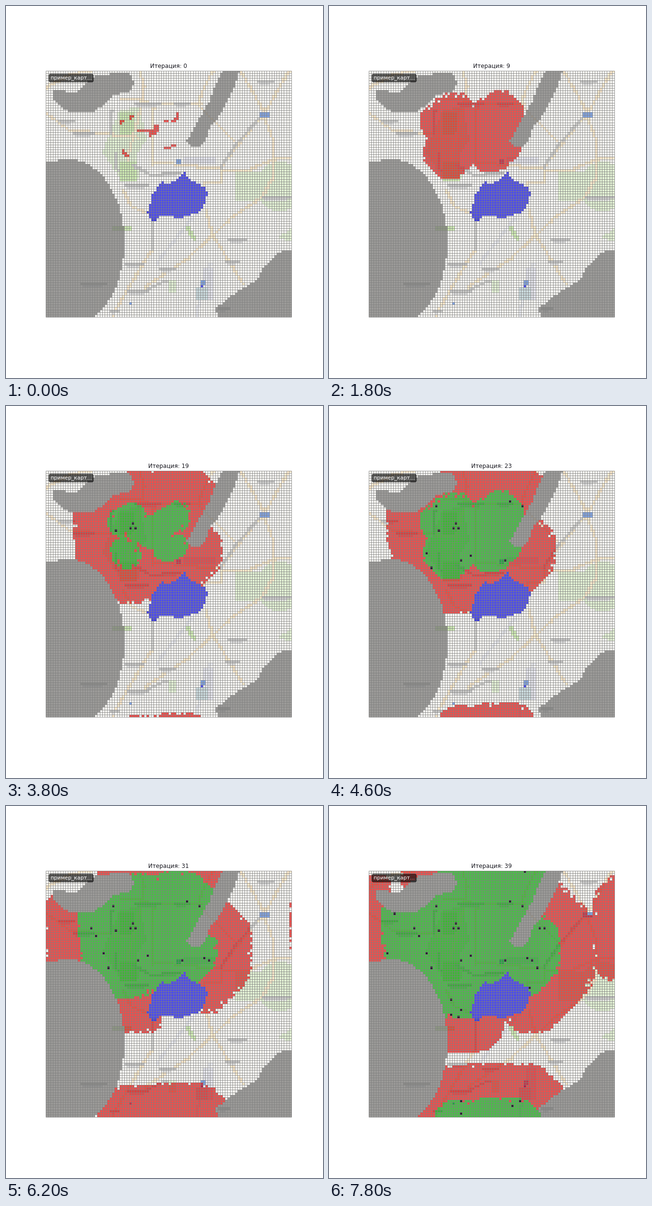
Recreate the animation shown at these times as a matplotlib script. Size 662 px wide and 775 px high, loop 8000 ms.

```python
import numpy as np
import matplotlib.pyplot as plt
from matplotlib.animation import FuncAnimation
from matplotlib.colors import to_rgb
from matplotlib.path import Path

N, STEPS, BURN_TIME = 100, 40, 14
rng = np.random.default_rng(7)
yy, xx = np.mgrid[0:N, 0:N]
centres = np.column_stack([xx.ravel() + 0.5, yy.ravel() + 0.5])


def area(*points):
    return Path(points).contains_points(centres).reshape(N, N)


def box(x, y, w, h=1):
    return (xx >= x) & (xx < x + w) & (yy >= y) & (yy < y + h)


def oval(cx, cy, rx, ry):
    return ((xx + 0.5 - cx) / rx) ** 2 + ((yy + 0.5 - cy) / ry) ** 2 < 1


def line(*points):
    """Cells crossed by a polyline."""
    mask = np.zeros((N, N), bool)
    for (xa, ya), (xb, yb) in zip(points, points[1:]):
        k = int(2 * max(abs(xb - xa), abs(yb - ya))) + 2
        x = np.linspace(xa, xb, k).astype(int).clip(0, N - 1)
        y = np.linspace(ya, yb, k).astype(int).clip(0, N - 1)
        mask[y, x] = True
    return mask


# ---- city map under the cells ----
city = np.empty((N, N, 3))
city[:] = to_rgb("#fbfaf6")


def paint(colour, *masks):
    for m in masks:
        city[m] = to_rgb(colour)


paint("#e3f2d5",
      area((30, 16), (38, 15), (41, 28), (37, 34), (38, 44), (31, 45), (23, 33)),
      box(77, 41, 11, 12), oval(95, 47, 9, 10),
      area((94, 68), (100, 64), (100, 69)), box(50, 85, 3, 5))
paint("#cde9b2", box(30, 37, 7, 8), box(30, 17, 6, 9), box(27, 63, 8, 2),
      line((57, 63), (60, 68)), line((58, 63), (60, 67)))
paint("#e4e4ec", box(64, 80, 4, 13), box(56, 35, 13, 3))
paint("#eaebf0", line((61, 58), (45, 78)), line((67, 78), (61, 99)))
paint("#fdeacc",
      line((100, 35), (93, 36), (83, 40), (71, 40), (43, 37)),
      line((88, 17), (92, 27), (92, 44), (88, 51), (74, 61), (58, 76), (40, 88)),
      line((99, 0), (89, 17), (72, 38), (71, 45), (64, 46)),
      line((79, 0), (89, 17)),
      line((68, 0), (63, 10), (62, 14), (77, 29)),
      line((0, 7), (9, 2), (18, 0)),
      line((38, 0), (40, 6), (39, 14), (33, 36)),
      line((30, 11), (36, 11), (44, 14), (63, 13)),
      line((0, 17), (9, 24), (37, 27)),
      line((31, 48), (35, 55), (42, 58)),
      line((65, 56), (68, 67), (80, 86)),
      line((43, 73), (27, 99)), line((44, 15), (43, 38)))
paint("#cececc",
      line((88, 18), (79, 28), (71, 39)), line((27, 16), (26, 25)),
      line((28, 33), (29, 40)), line((35, 38), (42, 42), (50, 42)),
      line((44, 60), (43, 72)), line((41, 89), (49, 85)))

labels = [  # column, row, width
    (86, 4, 7), (36, 13, 11), (52, 13, 7), (5, 20, 7), (11, 25, 9),
    (47, 41, 8), (32, 46, 10), (88, 51, 12), (74, 68, 8), (73, 77, 6),
    (32, 78, 8), (46, 80, 7), (14, 86, 11), (33, 89, 9), (26, 97, 4),
    (70, 96, 5),
]
for x, y, w in labels:
    paint("#dedede", box(x + 1, y + 1, w - 3))
    paint("#c4c4c3", box(x, y, w))
paint("#cbdbde", box(61, 88, 5, 5))
paint("#80a2de", box(63, 85, 2, 2), box(87, 17, 4, 2), box(53, 36, 2, 2),
      box(34, 94, 1))
paint("#5050eb", box(63, 87, 1))

# ---- cells that never burn ----
field = (oval(9, 69.5, 23, 33.5) | oval(9, 69, 23, 35) & (yy > 69)
         | box(0, 37, 9, 63))
ridge = area((3, 9), (4, 8), (7, 7.5), (9, 9), (12, 9), (17, 4.5), (21, 2),
             (25, 2), (28, 1), (34, 1), (36, 5), (34, 8.8), (27, 10),
             (24, 13.7), (19, 17), (10, 17), (5, 14), (3, 11))
strip = area((72, 0), (79, 0), (76, 8), (72, 16), (67, 23), (64, 30),
             (61, 31.6), (57.2, 29), (61, 22.5), (63, 18.5), (67, 12), (68, 8))
corner = area((100, 72.5), (98, 72.5), (93, 75), (88, 80.5), (87, 84),
              (76, 91), (69, 96.5), (70, 100), (100, 100))
lake = area((41, 57.3), (42, 57), (43, 51), (47, 45), (49, 46), (53, 45),
            (56.5, 41), (58.5, 44.5), (64, 46.7), (66, 49.5), (64, 55.5),
            (62, 57.7), (55, 59.8), (46, 59), (45, 60.6), (43, 60.6))
rock = field | ridge | strip | corner
wall = rock | lake

# ---- fire: arrival step of the front on a wrapping grid ----
seeds = [  # column, row, width
    (53, 17, 1), (53, 18, 1), (34, 18, 2), (34, 19, 1), (52, 19, 2),
    (30, 20, 2), (48, 20, 2), (51, 20, 2), (30, 21, 1), (44, 22, 2),
    (44, 23, 2), (37, 24, 9), (42, 25, 3), (42, 26, 1), (51, 30, 2),
    (48, 31, 3), (31, 32, 1), (31, 33, 2), (32, 34, 2),
]


def arrival():
    moves = {(sx * p, sy * q, c)
             for a, b, c in ((1, 0, 1), (1, 1, 1.4), (2, 1, 2.1), (3, 1, 3))
             for p, q in ((a, b), (b, a))
             for sx in (-1, 1) for sy in (-1, 1)}
    t = np.full((N, N), np.inf)
    for seed in seeds:
        t[box(*seed)] = 0
    for _ in range(80):
        old = t.copy()
        for dx, dy, cost in sorted(moves):
            t = np.minimum(t, np.roll(t, (dy, dx), (0, 1)) + cost)
            t[wall] = np.inf
        if np.array_equal(t, old):
            break
    delay = rng.choice([0, 1, 2], size=(N, N), p=[0.82, 0.14, 0.04])
    return np.where(t > 0, np.ceil(t - 1e-6) + delay, 0)


ignite = arrival()
scar = rng.random((N, N)) < 0.015


def picture(step):
    img = city.copy()

    def tint(mask, colour):
        img[mask] = 0.3 * city[mask] + 0.7 * np.array(to_rgb(colour))

    healed = ignite + BURN_TIME <= step
    tint(rock, "#727270")
    tint(lake, "#0404e4")
    tint(ignite <= step, "#e60705")
    tint(healed, "#00a400")
    img[healed & scar] = to_rgb("#26242e")
    return img


# ---- figure ----
plt.rcParams["font.family"] = "DejaVu Sans"
fig = plt.figure(figsize=(662 / 72, 775 / 72), dpi=72, facecolor="white")
ax = fig.add_subplot()
view = ax.imshow(picture(0), extent=(0, N, N, 0), interpolation="nearest")
edges = np.arange(N + 1)
style = dict(color="gray", lw=0.8, clip_on=False)
ax.vlines(edges, 0, N, **style)
ax.hlines(edges, 0, N, **style)
ax.set_xlim(0, N)
ax.set_ylim(N, 0)
ax.axis("off")
title = ax.set_title("Итерация: 0", fontsize=12, color="#16161e")
ax.text(0.02, 0.98, "пример_карт...", transform=ax.transAxes, fontsize=11,
        color="white", va="top", ha="left",
        bbox=dict(boxstyle="round,pad=0.3", facecolor="black", alpha=0.6))


def update(step):
    view.set_data(picture(step))
    title.set_text(f"Итерация: {step}")
    return view, title


anim = FuncAnimation(fig, update, frames=STEPS, interval=200, repeat=True,
                     repeat_delay=0, blit=False)
plt.show()
```
